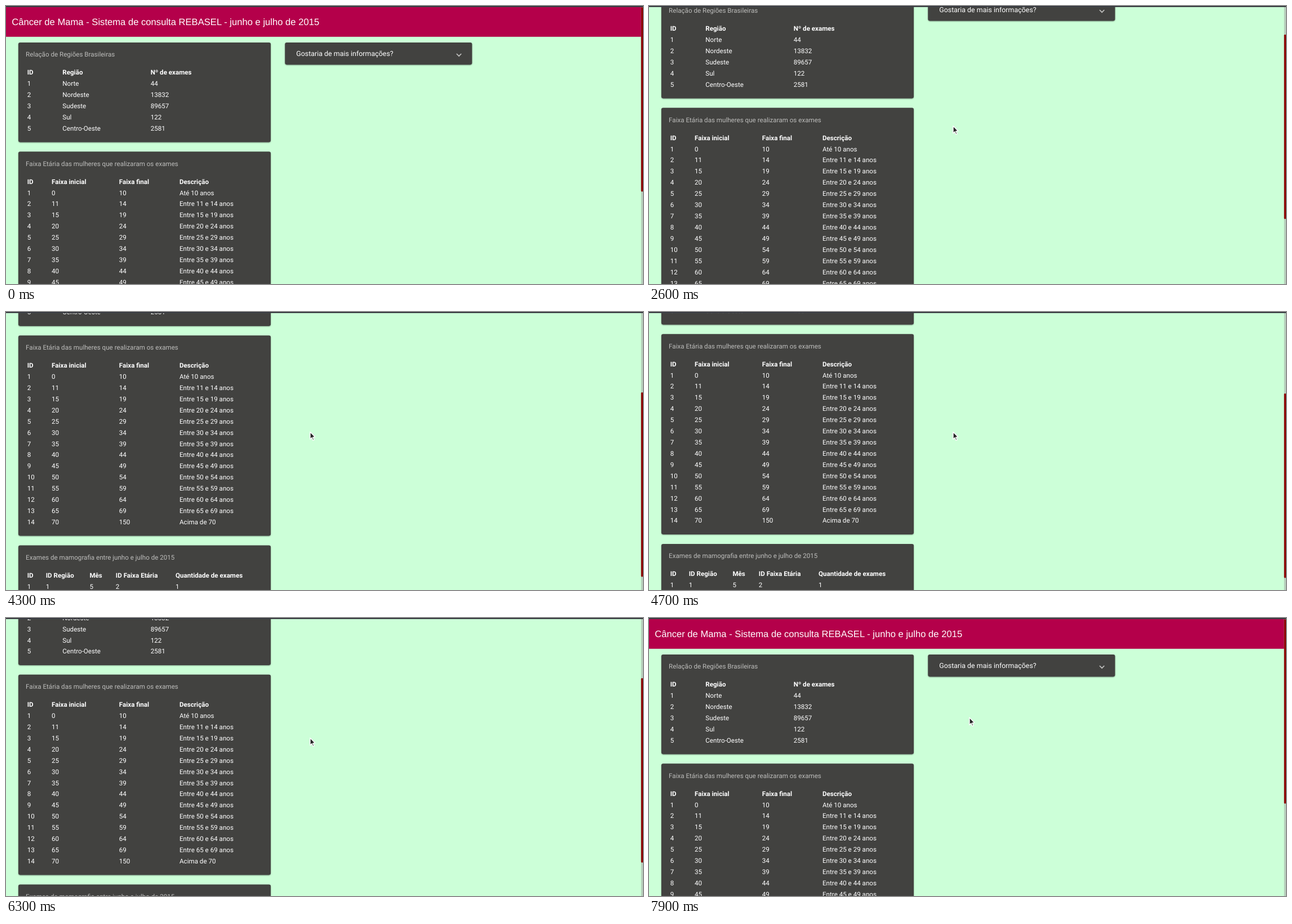
These frames come from a looping animation (1131x495 px, 8 s). An HTML page with a canvas:

```html
<!DOCTYPE html>
<html lang="pt-BR">
<head>
<meta charset="utf-8">
<title>Sistema de consulta</title>
<style>
  html, body { margin: 0; width: 100%; height: 100%; overflow: hidden; background: #ccffd8; }
  canvas { display: block; }
</style>
</head>
<body>
<canvas id="stage" width="1131" height="495"></canvas>
<script>
const ctx = document.getElementById('stage').getContext('2d');
const W = 1131, H = 495, LOOP = 8000, STEP = 100;
const TOP = 1.8, ZOOM = 0.83, ROW = 24 * ZOOM;
const THUMB_HEIGHT = 328.5, THUMB_RATIO = 0.65, THUMB_LAG = 25;
const CARD_COLOR = '#424240';

const ages = Array.from({ length: 14 }, (_, i) => {
  const from = [0, 11][i] ?? i * 5 + 5;
  const to = [10, 14][i] ?? (i === 13 ? 150 : from + 4);
  const label = i === 0 ? 'Até 10 anos' : i === 13 ? 'Acima de 70' : `Entre ${from} e ${to} anos`;
  return [i + 1, from, to, label];
});

const cards = [
  {
    y: 65, height: 177.4, title: 'Relação de Regiões Brasileiras',
    columns: [37.7, 100.3, 256.7], head: ['ID', 'Região', 'Nº de exames'],
    rows: [[1, 'Norte', 44], [2, 'Nordeste', 13832], [3, 'Sudeste', 89657],
           [4, 'Sul', 122], [5, 'Centro-Oeste', 2581]]
  },
  {
    y: 259.2, height: 356.7, title: 'Faixa Etária das mulheres que realizaram os exames',
    columns: [37.7, 81, 200.8, 308], head: ['ID', 'Faixa inicial', 'Faixa final', 'Descrição'],
    rows: ages
  },
  {
    y: 632.9, height: 200, title: 'Exames de mamografia entre junho e julho de 2015',
    columns: [37.7, 70.7, 148.4, 194.8, 301],
    head: ['ID', 'ID Região', 'Mês', 'ID Faixa Etária', 'Quantidade de exames'],
    rows: [[1, 1, 5, 2, 1]]
  }
];

// [time, offset]
const scrollKeys = [
  [0, 0], [2000, 0], [2600, 78], [3200, 132], [3300, 132], [3600, 150], [4300, 217.5],
  [4500, 219.5], [4600, 219.5], [4700, 220], [5500, 220], [5800, 203.5], [6300, 158.5],
  [7200, 0], [LOOP, 0]
];

function chord(i) {
  const a = scrollKeys[i], b = scrollKeys[i + 1];
  return a && b ? (b[1] - a[1]) / (b[0] - a[0]) : 0;
}

function tangent(i) {
  const left = chord(i - 1), right = chord(i);
  return left * right > 0 ? 2 * left * right / (left + right) : 0;
}

// Monotone cubic through the scroll keys.
function scrollAt(t) {
  if (t <= 0) return 0;
  const i = scrollKeys.findIndex((key, n) => n + 1 < scrollKeys.length && t < scrollKeys[n + 1][0]);
  const [t0, a] = scrollKeys[i], [t1, b] = scrollKeys[i + 1];
  const span = t1 - t0, u = (t - t0) / span, v = 1 - u;
  return a * v * v * (1 + 2 * u) + b * u * u * (3 - 2 * u)
    + span * u * v * (tangent(i) * v - tangent(i + 1) * u);
}

function pointerAt(t) {
  if (t < 700) return null;
  if (t >= 7900) return [569, 177.3];
  const u = Math.min(1, Math.max(0, (t - 800) / 400));
  const k = u * u * (3 - 2 * u);
  return [491.5 + 48.5 * k, 21 + 192.5 * k];
}

function text(value, x, y, color = '#fff', size = 14, weight = 400, family = 'Roboto') {
  ctx.font = `${weight} ${size * ZOOM}px "${family}", sans-serif`;
  ctx.fillStyle = color;
  ctx.fillText(value, x, y);
}

function box(x, y, w, h, radius) {
  ctx.beginPath();
  ctx.roundRect(x, y, w, h, radius);
  ctx.fill();
}

function panel(x, y, w, h) {
  ctx.save();
  ctx.fillStyle = CARD_COLOR;
  ctx.shadowColor = 'rgba(0,0,0,.36)';
  ctx.shadowBlur = 2;
  ctx.shadowOffsetY = 1;
  box(x, y, w, h, 3.3);
  ctx.restore();
}

function drawCard({ y, height, title, columns, head, rows }) {
  panel(21.9, y, 448.2, height);
  text(title, 35.1, y + 25.3, '#bdbdbb');
  head.forEach((cell, i) => text(cell, columns[i], y + 57.3, '#fff', 14, 700));
  rows.forEach((row, r) => row.forEach((cell, i) =>
    text(cell, columns[i], y + 77.3 + r * ROW)));
}

function drawExpander() {
  panel(495.3, 65, 332.2, 39.4);
  text('Gostaria de mais informações?', 515.2, 88.8, '#fff', 15);
  ctx.strokeStyle = '#c0c0be';
  ctx.lineWidth = 1.7;
  ctx.beginPath();
  ctx.moveTo(800, 85);
  ctx.lineTo(804.2, 89.2);
  ctx.lineTo(808.4, 85);
  ctx.stroke();
}

function drawPage(scroll) {
  ctx.save();
  ctx.beginPath();
  ctx.rect(0, TOP, W, H - TOP);
  ctx.clip();
  ctx.translate(0, -scroll);
  ctx.fillStyle = '#b4004a';
  ctx.fillRect(0, 0, W, 54.8);
  text('Câncer de Mama - Sistema de consulta REBASEL - junho e julho de 2015',
    10.2, 34.1, '#fff', 20.03, 400, 'Liberation Sans');
  cards.forEach(drawCard);
  drawExpander();
  ctx.restore();
}

function drawScrollbar(scroll) {
  ctx.fillStyle = '#b6cdbb';
  ctx.fillRect(1127.6, TOP, 3.4, H - TOP);
  ctx.fillStyle = '#8b0000';
  box(1127.6, 2 + THUMB_RATIO * scroll, 3.4, THUMB_HEIGHT, 1.5);
}

function drawPointer([x, y]) {
  ctx.save();
  ctx.translate(x, y);
  ctx.beginPath();
  [[0, 0], [0, 13], [3, 10.3], [5, 15.2], [7, 14.3], [5, 9.6], [8.7, 9]]
    .forEach(([px, py]) => ctx.lineTo(px, py));
  ctx.closePath();
  ctx.lineJoin = 'round';
  ctx.lineWidth = 1.4;
  ctx.strokeStyle = '#fff';
  ctx.fillStyle = '#262626';
  ctx.fill();
  ctx.stroke();
  ctx.restore();
}

function draw(now) {
  const t = Math.floor(now % LOOP / STEP) * STEP;
  ctx.textRendering = 'geometricPrecision';
  ctx.fillStyle = '#ccffd8';
  ctx.fillRect(0, 0, W, H);
  drawPage(scrollAt(t));
  drawScrollbar(scrollAt(t - THUMB_LAG));
  ctx.fillStyle = '#2c2b35';
  ctx.fillRect(0, 0, W, TOP);
  const pointer = pointerAt(t);
  if (pointer) drawPointer(pointer);
}

const start = performance.now();
function frame() {
  draw(performance.now() - start);
  requestAnimationFrame(frame);
}
frame();
</script>
</body>
</html>
```
